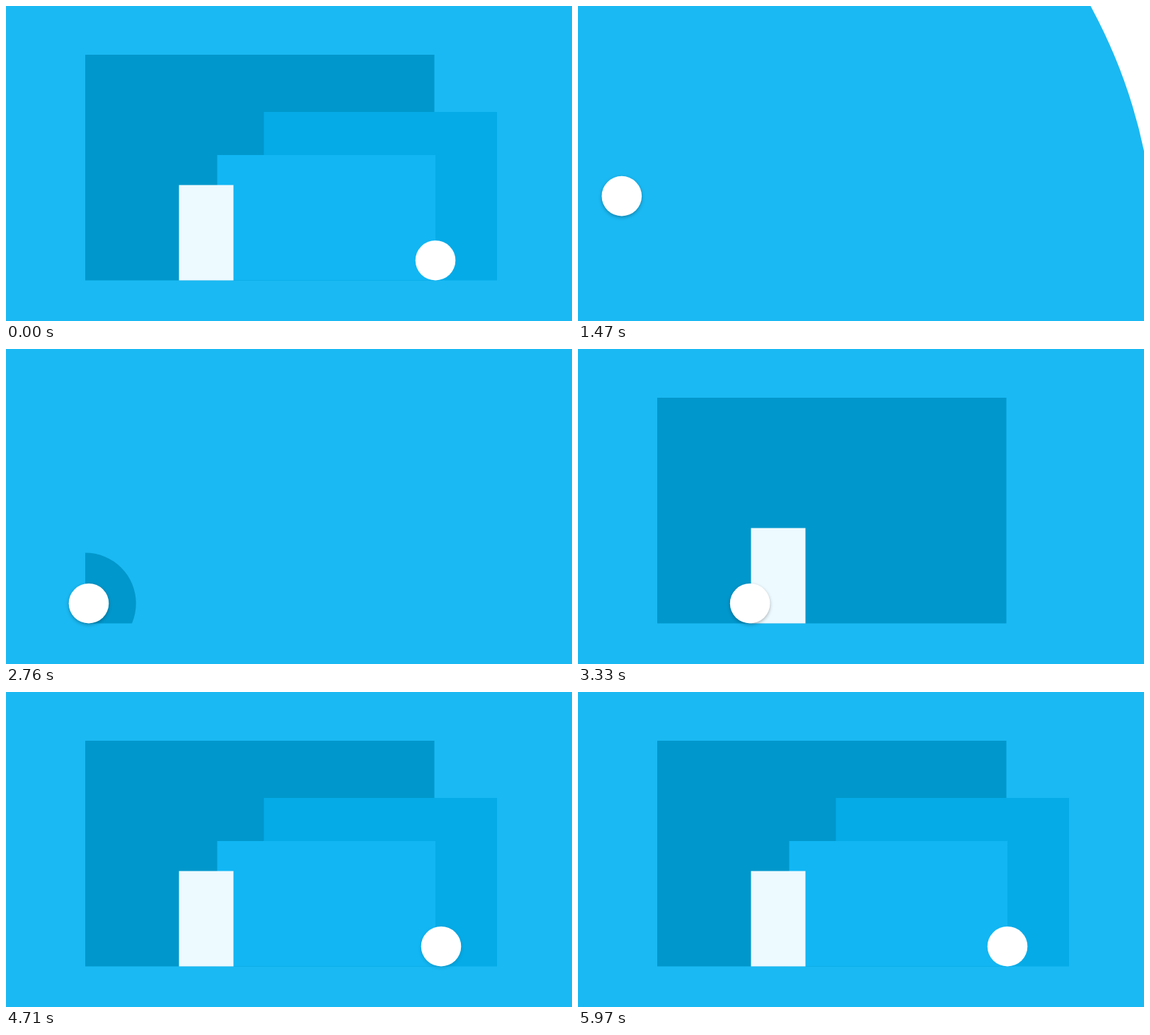
An HTML page with a canvas for the animation above (6000 ms loop, 800x446 px).

```html
<!DOCTYPE html>
<html lang="en">
<head>
<meta charset="utf-8">
<title>Ball and ripples</title>
<style>
  html, body { margin: 0; width: 100%; height: 100%; overflow: hidden; background: #1ab9f3; }
  canvas { display: block; width: 800px; height: 446px; }
</style>
</head>
<body>
<canvas id="stage" width="800" height="446"></canvas>
<script>
const ctx = document.getElementById('stage').getContext('2d');
const LOOP = 6000, STEP = 30;
const W = 800, H = 446;
const FLOOR = 360.2, BALL = 28.3, BASE = 388.5;
const START_X = 61.8, END_X = 607;
const BLUE = '#1ab9f3', WHITE = '#fff';

// Panels back to front; each is revealed by a ripple from cx at time start.
const panels = [
  { x: 112, y: 69, right: 605.5, color: '#0097cc', cx: 112, start: 2686 },
  { x: 364.5, y: 150, right: 694, color: '#04abe7', cx: 512, start: 3735 },
  { x: 298.5, y: 211, right: 607, color: '#11b6f3', cx: 436, start: 3350 },
  { x: 244.5, y: 253.5, right: 321.5, color: '#edfaff', cx: 283, start: 3050 }
];
const RIPPLE_SPEED = 0.97;

// Rolling path: time, x, velocity
const path = [
  [1860, START_X, 0],
  [2340, 83, 0.06],
  [2760, 117, 0.12],
  [2970, 152, 0.2],
  [3960, 463.5, 0.38],
  [4710, 615, 0.02],
  [5970, END_X, 0]
];

const clamp = v => Math.max(0, Math.min(1, v));

function rollX(t) {
  if (t <= path[0][0]) return START_X;
  const i = path.findIndex(p => p[0] >= t);
  if (i < 0) return END_X;
  const [t0, a, va] = path[i - 1], [t1, b, vb] = path[i];
  const d = t1 - t0, s = (t - t0) / d, s2 = s * s, s3 = s2 * s;
  return a * (2 * s3 - 3 * s2 + 1) + va * d * (s3 - 2 * s2 + s)
       + b * (3 * s2 - 2 * s3) + vb * d * (s3 - s2);
}

function hopY(t) {
  const s = clamp((t - 1110) / 750);
  return FLOOR - 4 * 91.2 * s * (1 - s);
}

function disc(x, y, r, color) {
  ctx.fillStyle = color;
  ctx.beginPath();
  ctx.arc(x, y, r, 0, Math.PI * 2);
  ctx.fill();
}

function ball(x, y, shade) {
  ctx.save();
  if (shade > 0) {
    ctx.shadowColor = `rgba(0,0,0,${0.28 * shade})`;
    ctx.shadowOffsetY = 2;
    ctx.shadowBlur = 5;
  }
  disc(x, y, BALL, WHITE);
  ctx.restore();
}

function fill(color) {
  ctx.fillStyle = color;
  ctx.fillRect(0, 0, W, H);
}

function panel(p, age) {
  if (age <= 0) return;
  ctx.save();
  ctx.beginPath();
  ctx.rect(p.x, p.y, p.right - p.x, BASE - p.y);
  ctx.clip();
  disc(p.cx, FLOOR, age * RIPPLE_SPEED, p.color);
  ctx.restore();
}

function draw(t) {
  if (t < 900) {
    fill(BLUE);
    panels.forEach(p => panel(p, LOOP));
    const s = Math.max(0, t - 450) / 300;
    disc(END_X, FLOOR, BALL + 228 * s ** 3, WHITE);
    return;
  }
  fill(WHITE);
  if (t < 1110) return;
  disc(START_X, FLOOR, 754.3 * ((t - 1110) / 360) ** 1.5, BLUE);
  panels.forEach(p => panel(p, t - p.start));
  const shade = clamp((t - 1110) / 150) * clamp((4950 - t) / 500);
  ball(rollX(t), hopY(t), shade);
}

const begin = performance.now();
function tick() {
  const t = (performance.now() - begin) % LOOP;
  draw(Math.floor(t / STEP) * STEP);
  requestAnimationFrame(tick);
}
tick();
</script>
</body>
</html>
```
